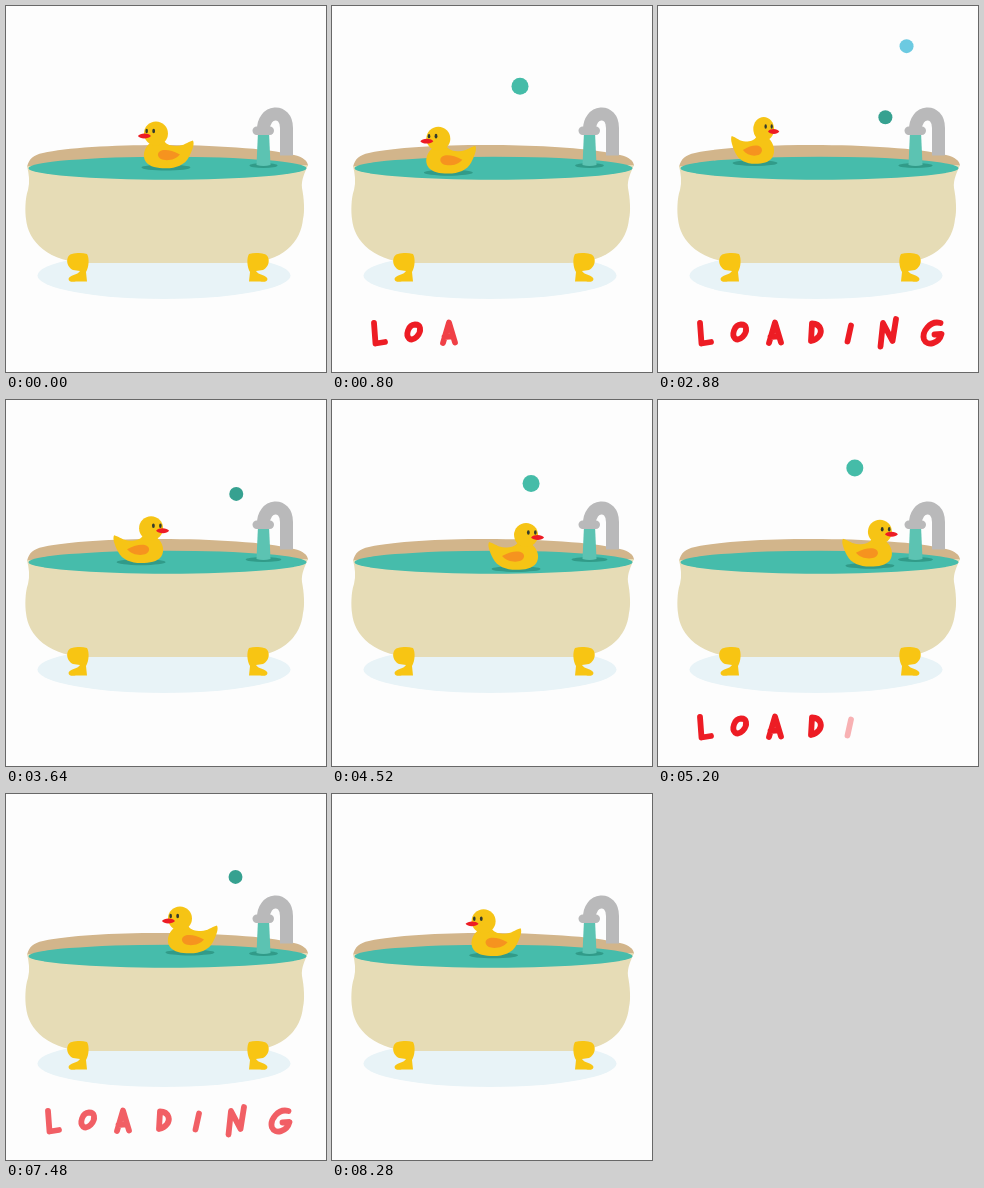
An HTML page for the animation above (8.32 s loop, 320x366 px).

```html
<!DOCTYPE html>
<html lang="en">
<head>
<meta charset="utf-8">
<title>Loading</title>
<style>
  html, body { margin: 0; width: 100%; height: 100%; overflow: hidden; background: #fdfdfd; }
  svg { display: block; width: 100%; height: 100%; }
</style>
</head>
<body>
<svg viewBox="0 0 320 366" role="img" aria-label="LOADING">
  <ellipse cx="158" cy="269.5" rx="126.5" ry="23.5" fill="#e8f3f7"/>

  <!-- tub -->
  <path fill="#d2b58b" d="M21 161C23 153 27 149 37 147C84 136 236 136 288 149C297 151 302 155 302 160Z"/>
  <path fill="#e6dcb6" d="M21 160C23 168 24 176 22 184C19 192 19 206 20 213C22 235 42 257 84 257H236C278 257 295 235 297 213C299 206 298 192 296 182C295 174 299 166 302 159Z"/>
  <ellipse cx="161.5" cy="162.2" rx="139" ry="11.5" fill="#46bcab"/>
  <g fill="#f8c513">
    <path id="foot" d="M66 248C60 249 59 260 67 264L74 265C72 269 63 269 62.5 273C63 276.5 67 276 70 275.5H81L80 266C83 261 83.5 252 81 248C76 246.5 70 247 66 248Z"/>
    <use href="#foot" transform="matrix(-1 0 0 1 324 0)"/>
  </g>

  <!-- tap -->
  <ellipse id="ripple" cx="257.5" cy="159.5" ry="2.5" fill="#319b89"/>
  <path fill="#5cc3b2" d="M252 126H263L264.5 159Q257.5 161 250.5 159Z"/>
  <g fill="#b9b9ba">
    <path d="M257.5 124C257 104 280.5 102 280.5 122V149.5" fill="none" stroke="#b9b9ba" stroke-width="13"/>
    <rect x="246.5" y="120.5" width="21.5" height="8.5" rx="4.2"/>
  </g>

  <g id="bubbles"></g>

  <ellipse id="shade" rx="24.5" ry="3" fill="#319b89"/>
  <g id="duck">
    <path fill="#f6c415" d="M-16 -25C-22 -20 -24 -12 -20 -6C-16 -1 -9 .3 0 .3C10 .3 19 -3 23 -11C26 -17 29 -24 27 -27.5C21 -26 18 -22 11 -22C5 -22 1 -23 -2 -27Z"/>
    <circle cx="-10" cy="-34.5" r="12" fill="#f6c415"/>
    <path fill="#f6931f" d="M-8 -13C-8 -19 2 -20 14 -13.5C8 -6 -7 -6 -8 -13Z"/>
    <path fill="#ed1c24" d="M-28 -32C-26 -35 -18 -35.5 -15 -32C-17 -29 -26 -28.5 -28 -32Z"/>
    <g fill="#333a2e">
      <ellipse cx="-19.3" cy="-37" rx="1.3" ry="2.2"/>
      <ellipse cx="-12.3" cy="-37" rx="1.4" ry="2.3"/>
    </g>
  </g>

  <g id="word" fill="none" stroke="#ed1c24" stroke-width="5.8" stroke-linecap="round" stroke-linejoin="round">
    <path d="M42 317L43.5 337.500L53 336"/>
    <path d="M83 318.500C76 319 73.500 329 77 332.500C82 336 89 328 88 322C87.500 319.500 86 318.500 83 318.500Z"/>
    <path d="M111 337L117 316.500L123 336.500M112.500 331L121 330"/>
    <path d="M154 317.500L153 335C160 333.500 164 328 162.500 323C161 319 157 317.500 154 317.500Z"/>
    <path d="M193 319.500L189.500 335.500"/>
    <path d="M222.500 340.500L225 317L234.500 335L238 313"/>
    <path d="M282.500 317C272 314 263.500 326 266 333.500C269 341 281 337.500 283.500 328L276.500 328.500"/>
  </g>
</svg>
<script>
const LOOP = 8320, WORD = LOOP / 2, RISE = .0228;
const el = id => document.getElementById(id);
const clamp = v => Math.min(1, Math.max(0, v));
const ease = v => (v = clamp(v), v * v * (3 - 2 * v));

// the duck's round trip: time, x, y
const stops = [
  [0, 160, 162], [1520, 85, 169.5], [2880, 97, 157.5],
  [4520, 184, 169.5], [6040, 229.5, 160], [7480, 184, 159]
];

const kinds = {
  teal: { fill: '#45bca8', r: 8.5, drift: -.0033, life: 1900 },
  blue: { fill: '#6ccae1', r: 7, drift: .0038, life: 1500 },
  dark: { fill: '#36a190', r: 7, drift: .0038, life: 1700 }
};

const bubbles = [
  ['teal', 350, 189.5, 90.5],
  ['blue', 1550, 243.5, 70.5],
  ['dark', 2650, 226.5, 116.5],
  ['teal', 4240, 200, 90],
  ['dark', 5900, 223.5, 119]
].map(([kind, born, x, y]) => {
  const dot = document.createElementNS('http://www.w3.org/2000/svg', 'circle');
  el('bubbles').append(dot);
  return { dot, born, x, y, ...kinds[kind] };
});

function set(node, attrs) {
  for (const name in attrs) node.setAttribute(name, attrs[name]);
}

function stop(i) {
  const n = stops.length, lap = Math.floor(i / n), [t, x, y] = stops[i - lap * n];
  return [t + lap * LOOP, x, y];
}

// smooth closed curve through the stops
function place(t) {
  const i = stops.findLastIndex(s => s[0] <= t);
  const [a, b, c, d] = [i - 1, i, i + 1, i + 2].map(stop);
  const span = c[0] - b[0], u = (t - b[0]) / span, v = 1 - u;
  return [1, 2].map(j => {
    const m0 = (c[j] - a[j]) / (c[0] - a[0]) * span;
    const m1 = (d[j] - b[j]) / (d[0] - b[0]) * span;
    return b[j] + (c[j] - b[j]) * ease(u) + u * v * (v * m0 - u * m1);
  });
}

function draw(t) {
  const [x, y] = place(t);
  const face = 1 - 2 * ease((t - 2326) / 660) + 2 * ease((t - 5600) / 660);
  set(el('duck'), { transform: `translate(${x} ${y}) scale(${face} 1)` });
  set(el('shade'), { cx: x, cy: y - .5, rx: 10 + 14.5 * Math.abs(face) });
  set(el('ripple'), { rx: 14 + 4 * Math.sin(Math.PI * t / LOOP) ** 2 });

  for (const b of bubbles) {
    const age = t - b.born;
    set(b.dot, {
      fill: b.fill,
      cx: b.x + b.drift * age,
      cy: b.y - RISE * age,
      r: b.r * clamp(Math.min(age, b.life - age) / 120)
    });
  }

  const w = t % WORD;
  set(el('word'), { opacity: 1 - clamp((w - 3200) / 400) });
  [...el('word').children].forEach((letter, i) =>
    set(letter, { opacity: clamp((w - 400 - i * 150) / 120) }));
}

const start = performance.now();
function tick() {
  draw(Math.max(0, performance.now() - start) % LOOP);
  requestAnimationFrame(tick);
}
tick();
</script>
</body>
</html>
```
